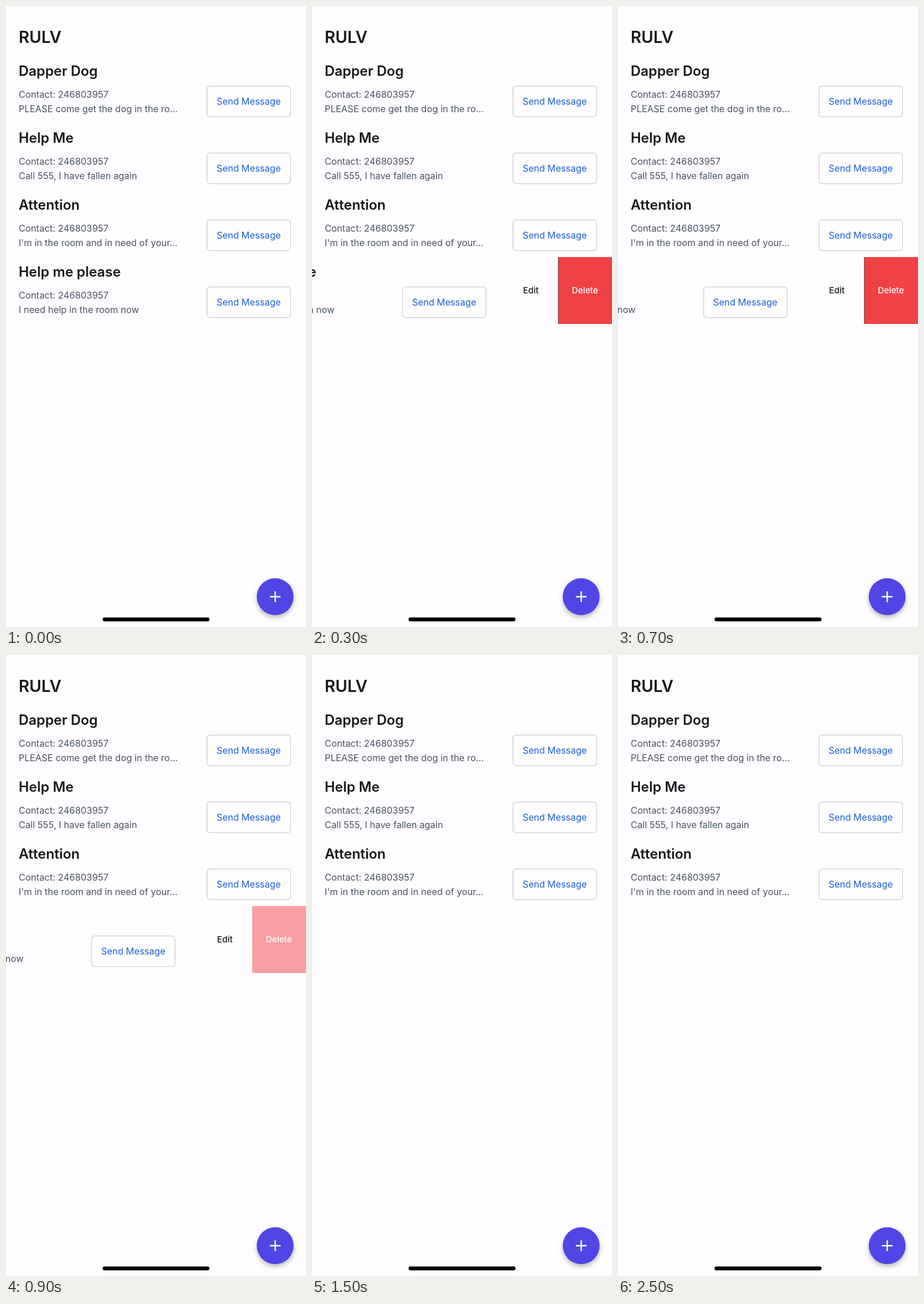
Write an HTML page that moves like this. It is 521 px wide and 1076 px high and loops after 2600 ms.

```html
<!DOCTYPE html>
<html lang="en">
<head>
<meta charset="utf-8">
<title>Contact list</title>
<style>
  html, body { margin: 0; width: 100%; height: 100%; overflow: hidden; background: #fffdff; }
  svg { display: block; width: 100%; height: 100%; font-family: Inter, "Open Sans", sans-serif; }
  .title { font-size: 28.5px; font-weight: 600; fill: #18171c; }
  .name { font-size: 24px; font-weight: 600; fill: #18171c; letter-spacing: -.05px; }
  .info { font-size: 15.95px; fill: #475266; }
  .send { font-size: 15.9px; fill: #1a5fd8; text-anchor: middle; }
  .box { fill: #fffeff; stroke: #d3d3d8; stroke-width: 1.5; }
  .action { font-size: 14.8px; font-weight: 500; text-anchor: middle; }
  .fab { fill: #4f46e5; filter: drop-shadow(0 4px 4px rgba(0, 0, 0, .28)); }
</style>
</head>
<body>
<svg viewBox="0 0 521 1076">
  <rect width="521" height="1076" fill="#fffdff"/>
  <text class="title" x="22" y="64">RULV</text>
  <g id="list"></g>
  <g id="swipe">
    <text class="action" x="380" y="498" fill="#18171c">Edit</text>
    <g id="delete">
      <rect x="427.5" y="435" width="93.5" height="116" fill="#f04245"/>
      <path id="edge" d="M428 435V551" stroke="#6b3436"/>
      <text class="action" x="474" y="498" fill="#fff">Delete</text>
    </g>
    <g id="slider"><rect y="435" width="521" height="116" fill="#fffdff"/></g>
  </g>
  <circle class="fab" cx="467.5" cy="1023.5" r="32"/>
  <path d="M458.2 1023.5H476.8M467.5 1014.2V1032.8" stroke="#fff" stroke-width="2.5"/>
  <rect x="167.7" y="1059.5" width="185.7" height="6.7" rx="3.35"/>
</svg>
<script>
const LOOP = 2600, STEP = 100, ROW = 116, REMOVED_AT = 1400;
const PHONE = "246803957";
const contacts = [
  ["Dapper Dog", "PLEASE come get the dog in the ro..."],
  ["Help Me", "Call 555, I have fallen again"],
  ["Attention", "I'm in the room and in need of your..."],
  ["Help me please", "I need help in the room now"],
];
// [time, value] pairs
const slide = [[0, 0], [100, -97.5], [200, -168], [300, -192], [400, -200], [500, -202.3], [600, -202], [700, -200.5]];
const fade = [[700, 1], [800, .35], [900, .5], [1000, .9], [1100, 1]];

const byId = id => document.getElementById(id);
const [list, swipe, del, edge, slider] = ["list", "swipe", "delete", "edge", "slider"].map(byId);

const row = ([name, message], i) => `
  <g transform="translate(0 ${87 + i * ROW})">
    <text class="name" x="22" y="34">${name}</text>
    <text class="info" x="22" y="72">Contact: ${PHONE}</text>
    <text class="info" x="22" y="97">${message}</text>
    <rect class="box" x="349.2" y="51.7" width="144.8" height="53" rx="5"/>
    <text class="send" x="421.5" y="84.3">Send Message</text>
  </g>`;

contacts.forEach((contact, i) => {
  const parent = i < contacts.length - 1 ? list : slider;
  parent.insertAdjacentHTML("beforeend", row(contact, i));
});

function valueAt(keys, t) {
  const next = keys.findIndex(([time]) => time > t);
  if (next === 0) return keys[0][1];
  if (next < 0) return keys[keys.length - 1][1];
  const [t0, v0] = keys[next - 1], [t1, v1] = keys[next];
  return v0 + (v1 - v0) * (t - t0) / (t1 - t0);
}

const start = performance.now();
function draw() {
  const elapsed = Math.max(0, performance.now() - start) % LOOP;
  const t = Math.floor(elapsed / STEP) * STEP;
  const opacity = valueAt(fade, t);
  slider.setAttribute("transform", `translate(${valueAt(slide, t)} 0)`);
  del.setAttribute("opacity", opacity);
  edge.setAttribute("visibility", opacity < 1 ? "hidden" : "inherit");
  swipe.setAttribute("visibility", t < REMOVED_AT ? "visible" : "hidden");
  requestAnimationFrame(draw);
}
draw();
</script>
</body>
</html>
```
